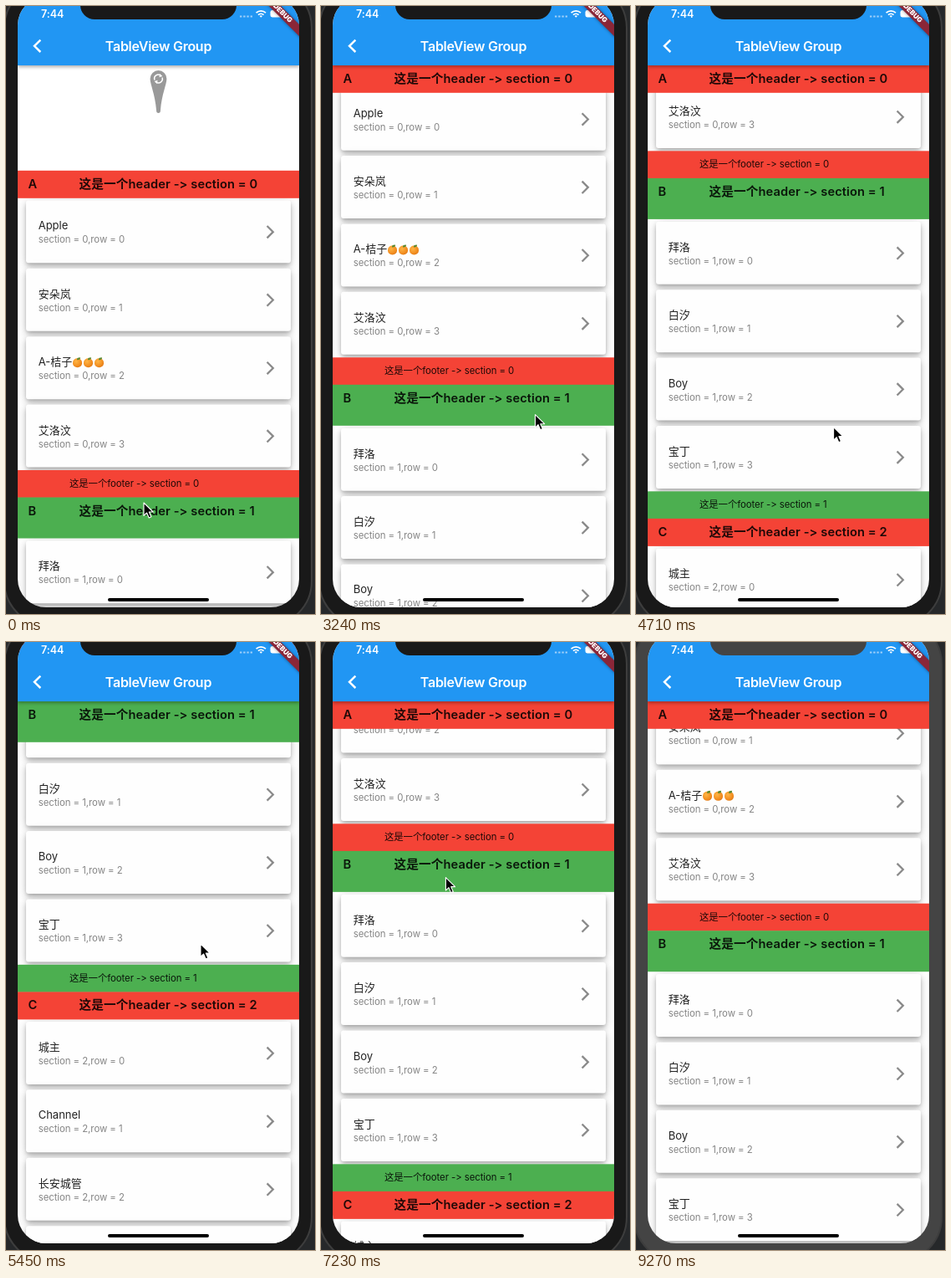
Write an HTML page that moves like this. It is 370 px wide and 727 px high and loops after 9370 ms.

```html
<!DOCTYPE html>
<html lang="zh-CN">
<head>
<meta charset="utf-8">
<title>TableView Group</title>
<style>
  html, body { margin: 0; width: 100%; height: 100%; overflow: hidden; background: #1f2021; }
  #stage {
    --bezel: #191919;
    position: relative; width: 370px; height: 727px; overflow: hidden; background: #26282a;
    font-family: Inter, "Noto Sans CJK SC", "Noto Sans CJK", sans-serif;
    font-feature-settings: "calt" 0;
    color: rgba(0, 0, 0, .87); white-space: nowrap;
  }
  #stage.dim { --bezel: #444; }
  #stage div, #stage svg { position: absolute; }
  svg { overflow: visible; fill: none; }
  .phone { left: -3px; top: -28px; width: 366px; height: 766px; border: 2px solid #3d3d3d; border-radius: 54px; background: var(--bezel); }
  .screen { left: 14px; top: -10.6px; width: 337px; height: 729.6px; border-radius: 34px; overflow: hidden; background: #fff; }
  /* keeps stage coordinates inside the rounded clip */
  .plane { left: -14px; top: 10.6px; width: 370px; height: 727px; }
  .text { line-height: 20px; margin-top: -10px; }
  .bar { left: 14px; top: -11px; width: 337px; height: 81.8px; background: #2196f3; box-shadow: 0 2px 4px rgba(0, 0, 0, .32); }
  .title { left: 14px; width: 337px; top: 48px; text-align: center; color: #fff; font-size: 16px; font-weight: 600; letter-spacing: -.27px; }
  .clock { left: 42px; top: 9.5px; color: #fff; font-size: 12.5px; font-weight: 600; }
  .notch { left: 89px; top: -30px; width: 187px; height: 46px; border-radius: 17px; background: var(--bezel); }
  .home { left: 122px; top: 707.6px; width: 121px; height: 4.4px; border-radius: 3px; background: #000; }
  .banner {
    left: 291.4px; top: 4.1px; width: 80px; height: 9.8px; transform: rotate(45deg);
    background: #8a2638; box-shadow: 0 0 4px rgba(0, 0, 0, .45);
    color: #fff; font-size: 8.2px; font-weight: 900; line-height: 9.8px; text-align: center;
  }
  .head, .foot, .row { left: 14px; top: 0; width: 337px; }
  .head .text { top: 16.4px; left: 73.5px; font-size: 14.65px; font-weight: 600; letter-spacing: .1px; }
  .head .letter { left: 12.5px; }
  .foot .text { top: 16.4px; left: 62px; font-size: 11.4px; letter-spacing: -.08px; }
  .card {
    left: 10px; top: 3.3px; width: 317px; height: 74.8px; border-radius: 3px; background: #fefefe;
    box-shadow: 0 2.4px 4px -1px rgba(0, 0, 0, .22), 0 4.4px 8px rgba(0, 0, 0, .15), 0 1px 13px rgba(0, 0, 0, .12);
  }
  .name { left: 14.7px; top: 29.8px; font-size: 13px; }
  .info { left: 14.7px; top: 46.4px; font-size: 11.4px; color: #858585; letter-spacing: -.06px; }
  .orange {
    display: inline-block; position: relative; width: 11.4px; height: 10.4px; margin: 0 .8px; vertical-align: -1.6px;
    border-radius: 50%; background: radial-gradient(circle at 38% 35%, #ffb545, #f08a1d 60%, #c9620f);
  }
  .orange::before { content: ""; position: absolute; left: 4.6px; top: -1.6px; width: 4.6px; height: 2.8px; border-radius: 80% 10%; background: #5b8a32; }
  .done { left: 148px; font-size: 11.4px; color: #999; }
</style>
</head>
<body>
<div id="stage">
  <div class="phone"></div>
  <div class="screen"><div class="plane">
    <div id="refresh">
      <svg id="drop" width="1" height="1">
        <path id="dropBody" fill="#999"/>
        <g stroke="#fff" stroke-width="1.5">
          <path d="M178 88.5A4.7 4.7 0 0 1 185.5 83.3M187 85.5A4.7 4.7 0 0 1 179.5 90.7"/>
          <path d="M184.2 81l3.2 3-4 1.2zM180.8 93l-3.2-3 4-1.2z" fill="#fff" stroke="none"/>
        </g>
      </svg>
      <svg id="spinner" width="1" height="1"></svg>
      <div id="done">
        <svg width="1" height="1"><path d="M118.6 0l4.6 4.6 9.4-9.4" stroke="#8e8e8e" stroke-width="1.6"/></svg>
        <div class="text done">Refresh completed</div>
      </div>
    </div>
    <div id="list"></div>
    <div class="bar"></div>
    <svg width="1" height="1">
      <path d="M41.3 40.6L34 47.8l7.3 7.2" stroke="#fff" stroke-width="2.5"/>
      <path d="M280 12.5h15" stroke="#9fd0f9" stroke-width="2" stroke-dasharray="2.4 1.8"/>
      <path d="M299.6 8.2a8 8 0 0 1 11.4 0M302 10.6a4.8 4.8 0 0 1 6.6 0" stroke="#fff" stroke-width="1.7"/>
      <path d="M305.3 13.8l-1.7-1.8a2.4 2.4 0 0 1 3.4 0z" fill="#fff"/>
      <rect x="316.5" y="5" width="17" height="8.4" rx="2.4" fill="#fff"/>
    </svg>
    <div class="text clock">7:44</div>
    <div class="text title">TableView Group</div>
    <div class="banner">DEBUG</div>
    <div class="home"></div>
  </div></div>
  <div class="notch"></div>
  <svg id="cursor" width="1" height="1">
    <path d="M0 0V15.4L3.6 12 6.2 18 8.9 16.8 6.3 11H11.2Z" fill="#000" stroke="#fff" stroke-width="1.1" stroke-linejoin="round"/>
  </svg>
</div>
<script>
const LOOP = 9370, STEP = 147.2;
const PT = 0.814, PIN = 70.8;         // pixels per point, bottom of the app bar
const ROW = 100 * PT, BAND = 40 * PT;
const RED = '#f44336', GREEN = '#4caf50';
const $ = id => document.getElementById(id);
const list = $('list');

const oranges = '<span class="orange"></span>'.repeat(3);
const sections = [
  { letter: 'A', color: RED, height: 40, names: ['Apple', '安朵岚', 'A-桔子' + oranges, '艾洛汶'] },
  { letter: 'B', color: GREEN, height: 60, names: ['拜洛', '白汐', 'Boy', '宝丁'] },
  { letter: 'C', color: RED, height: 40, names: ['城主', 'Channel', '长安城管', ''] },
];

// [ms, y of the first header]
const scrollKeys = [
  [0, 196.8], [150, 195], [300, 186], [450, 160], [600, 140], [750, 129], [900, 123], [1180, 119.5],
  [2060, 119.5], [2210, 112], [2360, 95], [2500, 80], [2650, 73], [2790, PIN],
  [3090, PIN], [3240, 62], [3974, -50.7], [4270, -66], [4420, -85], [4900, -250], [5200, -340],
  [5446, -379.3], [5600, -386], [5740, -384], [6477, -291.8], [6780, -225], [7070, -163],
  [7360, -118], [7660, -85], [7949, -63.9], [8250, -53], [8550, -47.5], [8830, -45.5],
];
// [ms, x, y] of the pointer tip
const cursorKeys = [
  [0, 165, 594], [300, 172, 600], [1180, 288, 528], [1910, 288, 528], [2060, 297, 514], [2790, 262, 512],
  [3090, 260, 510], [3974, 239, 383], [4270, 238, 440], [4420, 238, 560], [5446, 233, 361],
  [5740, 233, 372], [6477, 237, 479], [6780, 232, 500], [7660, 64, 56], [7800, 60, 44],
];

function track(keys, t, column = 1) {
  const i = keys.findIndex(key => key[0] > t);
  if (i < 0) return keys[keys.length - 1][column];
  const a = keys[i - 1], b = keys[i];
  return a[column] + (b[column] - a[column]) * (t - a[0]) / (b[0] - a[0]);
}

function addBlock(className, y, height, html, color = '') {
  const el = document.createElement('div');
  el.className = className;
  el.style.height = height + 'px';
  el.style.background = color;
  el.style.transform = `translateY(${y}px)`;
  el.innerHTML = html;
  list.append(el);
  return el;
}

const chevron = '<svg width="1" height="1"><path d="M288.6 30.6l7.2 7.2-7.2 7.2" stroke="#8a8a8a" stroke-width="2.3"/></svg>';
let bottom = 0;
sections.forEach((section, s) => {
  section.top = bottom;
  const headHeight = section.height * PT;
  bottom += headHeight;
  section.names.forEach((name, r) => {
    addBlock('row', bottom, ROW, `<div class="card"><div class="text name">${name}</div>
      <div class="text info">section = ${s},row = ${r}</div>${chevron}</div>`);
    bottom += ROW;
  });
  addBlock('foot', bottom, BAND, `<div class="text">这是一个footer -&gt; section = ${s}</div>`, section.color);
  bottom += BAND;
  section.head = addBlock('head', section.top, headHeight,
    `<div class="text letter">${section.letter}</div><div class="text">这是一个header -&gt; section = ${s}</div>`, section.color);
});

const ticks = Array.from({ length: 12 }, (_, i) =>
  `<path d="M0 -4.2V-7.6" stroke="#777" stroke-width="1.6" stroke-linecap="round" opacity="${.25 + i * .06}" transform="rotate(${i * 30})"/>`);
$('spinner').innerHTML = `<g>${ticks.join('')}</g>`;

const show = (el, on) => { el.style.visibility = on ? 'visible' : 'hidden'; };
const move = (el, x, y) => { el.style.transform = `translate(${x}px, ${y}px)`; };

function drawRefresh(t, y) {
  const pulling = t < 420, loading = t >= 420 && t < 1600;
  show($('drop'), pulling);
  show($('spinner'), loading);
  show($('done'), t >= 1600 && t < 2800);
  const tip = y - 71.5;
  $('dropBody').setAttribute('d',
    `M172.6 87A9.9 9.9 0 0 1 192.4 87C192.4 94 186.5 105 184.9 ${tip}Q184.9 ${tip + 2.6} 182.5 ${tip + 2.6}T180.1 ${tip}C178.5 105 172.6 94 172.6 87Z`);
  move($('spinner'), 182.5, 95);
  $('spinner').firstChild.setAttribute('transform', `rotate(${Math.floor(t / 83) * 30})`);
  move($('done'), 0, y - 24.6);
}

function draw(time) {
  const t = Math.floor((time + 8) / STEP) * STEP;
  const y = track(scrollKeys, t);
  move(list, 0, y);
  const pinned = sections.filter(section => y + section.top <= PIN).pop();
  for (const section of sections) {
    const stuck = section === pinned;
    move(section.head, 0, stuck ? PIN - y : section.top);
    section.head.style.zIndex = stuck ? 1 : 0;
  }
  drawRefresh(t, y);
  show($('cursor'), t < 8050);
  move($('cursor'), track(cursorKeys, t), track(cursorKeys, t, 2));
  $('stage').classList.toggle('dim', time >= 9268);
}

const start = performance.now();
function tick() {
  draw((performance.now() - start) % LOOP);
  requestAnimationFrame(tick);
}
tick();
</script>
</body>
</html>
```
